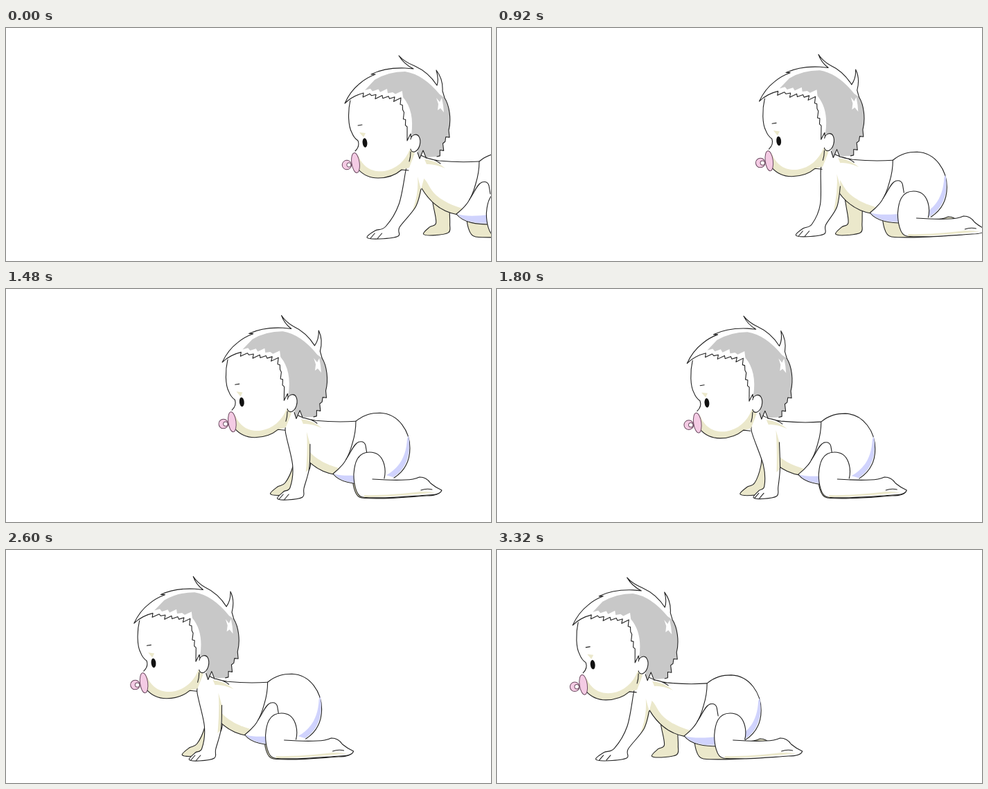
An HTML page that plays this animation: 700 by 337 pixels, repeating every 3360 ms.

```html
<!DOCTYPE html>
<html lang="en">
<head>
<meta charset="utf-8">
<title>Crawling baby</title>
<style>
  html, body { margin: 0; width: 100%; height: 100%; overflow: hidden; background: #fff; }
  svg { display: block; width: 100vw; height: 100vh; fill: none; stroke-linejoin: round; stroke-linecap: round; }
  .line { stroke: #222; stroke-width: 1.1; }
  .white { fill: #fff; }
  .cream { fill: #ebe8cb; }
  .blue { fill: #d0d3fd; }
  .grey { fill: #c8c8c8; }
  .pink { fill: #f4cbe4; stroke: #6b4a60; stroke-width: 1; }
  .ink { fill: #111; }
</style>
</head>
<body>
<svg viewBox="0 0 700 337">
  <defs>
    <path id="leg" d="M737 274C740 262 738 236 716 236C698 236 694 252 693 268C693 280 696 300 706 301C735 304 770 300 800 298Q818 298 820 291Q811 287 804 281Q798 272 788 272Q779 276 768 276Q750 277 720 275"/>
  </defs>
  <g id="baby">
    <path id="farArm" class="cream line"/>
    <use id="farLeg" class="cream line" href="#leg"/>

    <g id="body">
      <path class="white" d="M583 170L606 188Q640 195 683 193L677 240Q668 262 652 270C628 266 612 252 600 232L575 205Z"/>
      <path class="cream" d="M600 215C610 222 610 232 621 242C633 252 645 257 659 261L652 270C628 266 612 252 600 232Z"/>
      <path class="cream" d="M604 190Q620 191 634 203Q618 196 607 197Z"/>
      <path class="line" d="M597 183Q606 189 625 192Q655 195 683 193M606 188Q618 189 627 196M600 232C612 252 628 266 652 270"/>
      <path id="diaper" class="white line" d="M700 284C680 284 660 282 650 269C664 258 672 248 678 225C682 212 683 203 683 193C695 183 706 181 718 181C745 182 761 208 761 232C761 252 752 266 738 275"/>
      <path class="blue" d="M651 269C664 273 682 272 706 269L706 283C676 283 660 280 651 269Z"/>
      <path class="blue" d="M759 214C764 242 754 264 737 274L727 271C747 260 756 242 757 218Z"/>
      <path class="white line" d="M669 248C677 236 680 226 687 223Q695 221 697 228L699 240"/>
    </g>

    <g id="nearLeg">
      <use class="white line" href="#leg"/>
      <path class="cream" d="M708 298Q740 299 790 293L812 294Q750 301 708 301Z"/>
      <path class="line" d="M790 291Q798 288 806 290"/>
    </g>

    <path id="armFill" class="white"/>
    <path id="armShade" class="cream"/>
    <path id="armLine" class="line"/>

    <g id="head">
      <path class="white" d="M497 100C492 120 494 142 499 151Q502 159 508 163Q511 171 503 178L506 200C514 212 524 217 537 217C553 217 564 212 572 205L583 200L600 180L625 150L600 80L540 75Z"/>
      <path class="cream" d="M508 184C516 203 530 209 546 207C563 204 576 193 583 175L590 181L582 202L572 205C562 213 551 217 537 217C524 217 513 211 507 202Z"/>
      <path class="cream" d="M510 151L519 152L516 158Z"/>
      <path class="line" d="M497 104C493 122 494 142 499 151Q502 159 508 163Q511 171 504 178M508 204C515 212 524 217 537 217C552 217 563 212 571 205L581 206M508 141L514 140"/>
      <ellipse class="ink" cx="518" cy="166" rx="3.4" ry="6.8" transform="rotate(-6 518 166)"/>

      <path id="hairFill" class="white"/>
      <path id="hairGrey" class="grey"/>
      <path class="white" d="M621 101L626 107L629 101L631 112L632 122L627 116L623 119L624 110Z"/>
      <path id="hairLine" class="line"/>

      <path class="white line" d="M584 161C585 154 593 152 596 157C600 164 597 176 590 179Q585 180 584 175"/>
      <path class="line" d="M584 179Q584 187 582 193"/>

      <ellipse class="pink" cx="504.5" cy="195" rx="5.6" ry="14.5" transform="rotate(-8 504.5 195)"/>
      <circle class="pink" cx="492" cy="198" r="6.8"/>
      <circle class="pink" cx="495" cy="198" r="3.2" style="fill:#fff"/>
    </g>
  </g>
</svg>
<script>
const LOOP = 3360, CYCLE = 1120, STEP = 40, TAU = Math.PI * 2;
const $ = id => document.getElementById(id);
const setPath = (id, d) => $(id).setAttribute('d', d);
const move = (id, x, y, more = '') => $(id).setAttribute('transform', `translate(${x} ${y}) ${more}`);
const mix = (a, b, k) => a + (b - a) * k;
const wave = p => (1 - Math.cos(TAU * p)) / 2;

// Smooth curve through the points
function curve(pts) {
  const at = i => pts[Math.max(0, Math.min(pts.length - 1, i))];
  let d = 'M' + pts[0];
  for (let i = 0; i < pts.length - 1; i++) {
    const [a, b, c, e] = [at(i - 1), at(i), at(i + 1), at(i + 2)];
    d += 'C' + [b.map((v, j) => v + (c[j] - a[j]) / 6), c.map((v, j) => v - (e[j] - b[j]) / 6), c];
  }
  return d;
}

// Jagged strands between two points, each tip pushed out by dx, dy
function strands(x0, y0, x1, y1, n, dx, dy) {
  let d = '';
  for (let i = 1; i <= n; i++) {
    const size = 0.8 + 0.4 * Math.sin(i * 2.4);
    const x = mix(x0, x1, i / n), y = mix(y0, y1, i / n);
    const tipX = mix(x0, x1, (i - 0.5) / n) + dx * size, tipY = mix(y0, y1, (i - 0.5) / n) + dy * size;
    d += `L${tipX} ${tipY}L${x} ${y}`;
  }
  return d;
}

// Outline from the shoulder round the hand and up to the armpit
function arm(shoulder, elbow, wrist, reach, armpit) {
  const [ex, ey] = elbow, [wx, wy] = wrist;
  return curve([
    [shoulder[0] + 3, shoulder[1] - 14], shoulder, [ex - 12, ey], [wx - 10, wy - 1],
    [wx - reach * 0.68, wy + 5], [wx - reach, wy + 15], [wx - reach * 0.5, wy + 17], [wx + 8, wy + 13],
    [wx + 10, wy], [ex + 12, ey + 4], armpit
  ]);
}

function drawArms(p) {
  const k = 1.24 * wave(p - 0.01);
  const lift = p > 0.5 ? 4 * wave(2 * p) : 0;
  const elbow = [mix(579, 608, k), 255], wrist = [mix(558, 605, k), 288 - lift];
  const reach = mix(37, 27, k), armpit = [mix(599, 620, k), mix(233, 223, k)];
  const outline = arm([mix(577, 582, k), 206], elbow, wrist, reach, armpit);
  const finger = f => `M${wrist[0] - reach * f} ${wrist[1] + 9}l-6 7`;
  const [ax, ay] = armpit, [ex, ey] = elbow;
  setPath('armFill', outline + 'L606 208L600 190Z');
  setPath('armShade', `M${ax - 5} ${ay - 18}Q${ax - 3} ${ay + 8} ${ex + 7} ${ey + 10}L${ex + 11} ${ey + 6}Q${ax} ${ay + 12} ${ax} ${ay}Z`);
  setPath('armLine', outline + finger(0.7) + finger(0.42));

  const f = wave((p + 0.09) ** 1.1);
  setPath('farArm', arm([mix(594, 612, 1 - f), 225], [mix(630, 600, f), 256], [mix(633, 584, f), 283 - 2 * f],
    mix(28, 32, f), [mix(647, 612, f), 240]));
}

function drawHair(s) {
  const crown = `M489 109Q497 91 511 80Q520 72 533 67L527 67Q547 57 576 58L588 59` +
    `Q${574 + s * 0.6} 52 ${567 + s} 40Q${575 + s * 0.7} 49 590 55Q610 64 622 83` +
    `Q${625 + s * 0.5} 74 ${621 + s} 61Q${631 + s * 0.5} 74 630 91L633 101C640 112 643 132 639 148`;
  const nape = strands(639, 148, 622, 186, 4, 3, 5);
  const fringe = 'Q500 98 516 94' + strands(516, 94, 570, 101, 6, -5, 5) + strands(570, 101, 579, 143, 4, -2, 4) + 'L579 163L584 153L585 161';
  const neck = 'L606 187L602 177L597 189L594 180';
  setPath('hairFill', crown + nape + neck + 'L585 161L579 150L570 101L516 94Z');
  setPath('hairLine', crown + nape + 'M606 187L602 177L597 189L594 180M489 109' + fringe);
  setPath('hairGrey', 'M518 90L532 75Q552 63 576 63Q602 67 626 96L633 101C640 112 643 132 639 148' +
    nape + neck + 'L597 162Q590 152 585 155Q590 120 573 100' + strands(573, 97, 518, 90, 5, 4, -5) + 'Z');
}

function draw(t) {
  const p = t % CYCLE / CYCLE;
  const rise = wave(2 * p);
  const slide = q => 8.5 * Math.cos(TAU * (q + 0.03)) - 8;
  const travel = 382 * t / LOOP + 11 * Math.sin(Math.PI * p) ** 0.7;
  move('baby', -travel, 0);
  move('body', 0, -2.2 * rise);
  move('head', 0, -2 * rise, `rotate(${rise} 585 190)`);
  move('nearLeg', slide(p), 0);
  move('farLeg', slide(p + 0.5) - 12, 1);
  drawArms(p);
  drawHair(8 * rise);
}

function frame() {
  const t = performance.now() % LOOP;
  draw(Math.floor(t / STEP) * STEP);
  requestAnimationFrame(frame);
}
frame();
</script>
</body>
</html>
```
